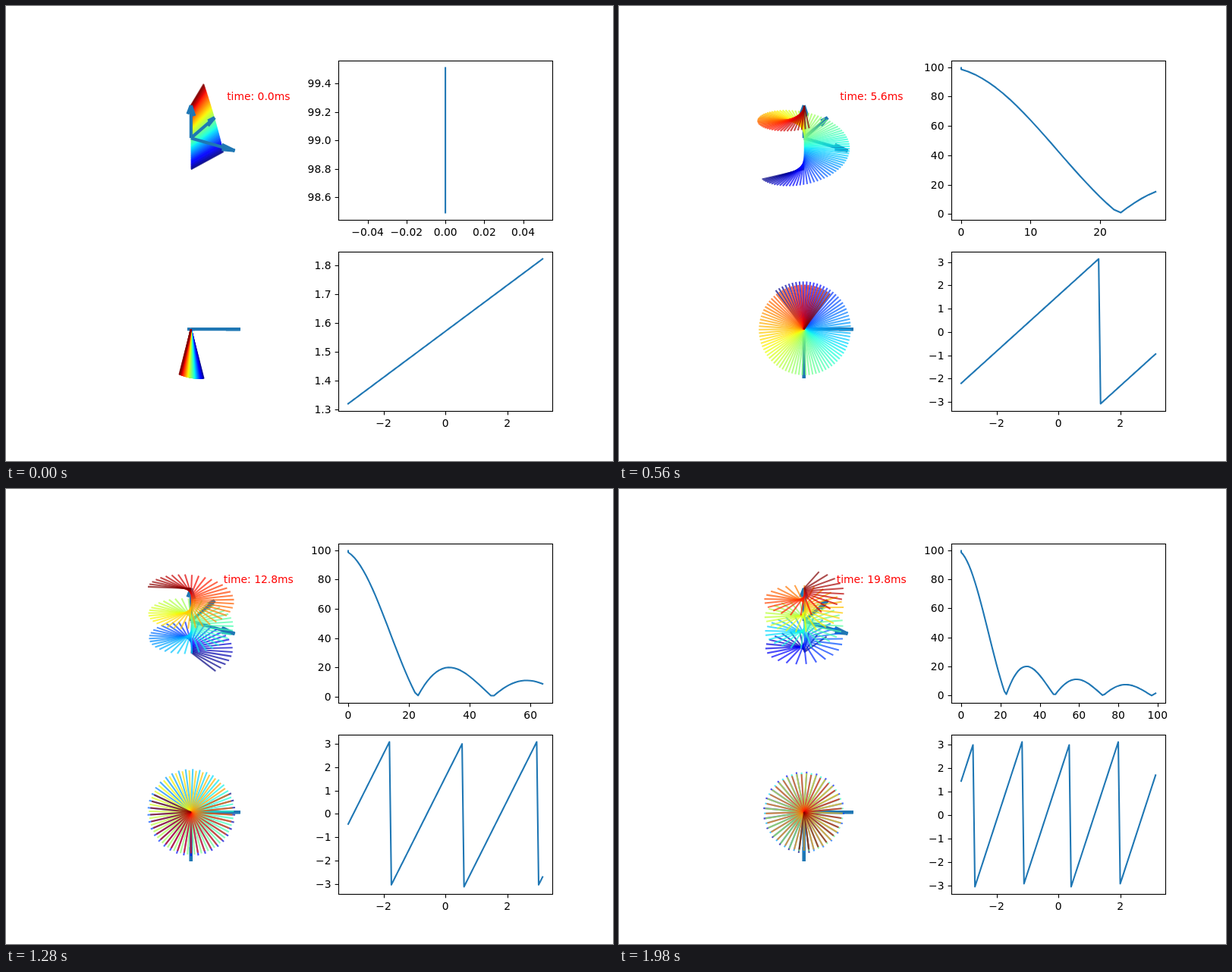
Animation of 800 by 600 pixels, one loop 2 s. Source, as an HTML page with a canvas:

```html
<!DOCTYPE html>
<html>
<head>
<meta charset="utf-8">
<style>
html, body { margin: 0; width: 100%; height: 100%; overflow: hidden; background: #fff; }
canvas { display: block; }
</style>
</head>
<body>
<canvas id="stage" width="800" height="600"></canvas>
<script>
const ctx = document.getElementById('stage').getContext('2d');
const PI = Math.PI, COUNT = 100, FRAMES = 100, FRAME_MS = 20;
const BLUE = '#1f77b4', THIN = 1.11, LINE = 2.083, THICK = 4.167, TICK = 4.86;
const LEFT = 438.18, WIDTH = 281.82, HEIGHT = 210;
const range = n => Array.from({ length: n }, (_, i) => i);
const snap = v => Math.round(v) + 0.5;

function stroke(points, color, width, cap = 'butt') {
  ctx.strokeStyle = color;
  ctx.lineWidth = width;
  ctx.lineCap = cap;
  ctx.lineJoin = 'round';
  ctx.beginPath();
  points.forEach(([x, y]) => ctx.lineTo(x, y));
  ctx.stroke();
}

function label(text, x, y, align, color = '#000') {
  ctx.font = '13.89px "DejaVu Sans", sans-serif';
  ctx.textAlign = align;
  ctx.fillStyle = color;
  ctx.fillText(text, x, y);
}

// Piecewise linear lookup through [position, value] stops
function ramp(stops, v) {
  const i = Math.max(1, stops.findIndex(s => v <= s[0]));
  const [a, p] = stops[i - 1], [b, q] = stops[i];
  return 255 * (p + (q - p) * (v - a) / (b - a));
}

const JET = [
  [[0, 0], [0.35, 0], [0.66, 1], [0.89, 1], [1, 0.5]],
  [[0, 0], [0.125, 0], [0.375, 1], [0.64, 1], [0.91, 0], [1, 0]],
  [[0, 0.5], [0.11, 1], [0.34, 1], [0.65, 0], [1, 0]]
];
const spins = range(COUNT).map(i => {
  const v = i / (COUNT - 1);
  return { z: 2 * v - 1, color: `rgba(${JET.map(s => Math.round(ramp(s, v)))},0.7)` };
});

// Perspective camera looking at the origin, drawn around (243.8, cy)
function camera(azim, elev, cy) {
  const a = azim * PI / 180, e = elev * PI / 180;
  const ca = Math.cos(a), sa = Math.sin(a), ce = Math.cos(e), se = Math.sin(e);
  return ([x, y, z]) => {
    x *= 4 / 7; y *= 4 / 7; z *= 3 / 7;
    const near = ce * (ca * x + sa * y) + se * z;
    const k = 1135.135 / (10 - near);
    return [243.84 + k * (ca * y - sa * x), cy - k * (ce * z - se * (ca * x + sa * y))];
  };
}
const sideView = camera(-60, 30, 174.16);
const endView = camera(-90, -90, 426.16);

const C = 1 - 0.3 * Math.cos(PI / 12), S = 0.3 * Math.sin(PI / 12);
const ARROWS = [
  [[1, 0, 0], [C, 0, S], [C, 0, -S]],
  [[0, 1, 0], [0, C, S], [0, C, -S]],
  [[0, 0, 1], [S, 0, C], [-S, 0, C]]
];

function drawArrows(view) {
  for (const [tip, ...barbs] of ARROWS)
    for (const p of [[0, 0, 0], ...barbs]) stroke([view(p), view(tip)], BLUE, THICK);
}

const twist = n => 0.04 * n;
const decay = n => Math.exp(-n / 450);

function drawSpins(view, n) {
  const r = decay(n);
  for (const { z, color } of spins) {
    const phase = PI / 2 + twist(n) * PI * z;
    const tip = [r * Math.cos(phase), r * Math.sin(phase), z];
    stroke([view([0, 0, z]), view(tip)], color, LINE);
  }
}

function signal(n) {
  const sum = spins.reduce((s, { z }) => s + Math.cos(twist(n) * PI * z), 0);
  return Math.abs(sum) * decay(n);
}

function wrapped(n, z) {
  const phase = PI / 2 + twist(n) * PI * z;
  return Math.atan2(Math.sin(phase), Math.cos(phase));
}

function limits(values) {
  let lo = Math.min(...values), hi = Math.max(...values);
  if (lo === hi) { lo -= 0.05; hi += 0.05; }
  const pad = 0.05 * (hi - lo);
  return [lo - pad, hi + pad];
}

function ticks([lo, hi], bins) {
  const raw = (hi - lo) / bins, base = Math.floor(Math.log10(raw));
  const m = [1, 2, 2.5, 5, 10].find(s => s * 10 ** base >= raw);
  const step = m * 10 ** base;
  const digits = Math.max(0, (m === 2.5 ? 1 : m === 10 ? -1 : 0) - base);
  const first = Math.ceil(lo / step), last = Math.floor(hi / step);
  return range(last - first + 1).map(i => {
    const v = (first + i) * step;
    return [v, (v < 0 ? '\u2212' : '') + Math.abs(v).toFixed(digits)];
  });
}

function plot(top, points) {
  const xs = limits(points.map(p => p[0])), ys = limits(points.map(p => p[1]));
  const px = v => LEFT + WIDTH * (v - xs[0]) / (xs[1] - xs[0]);
  const py = v => top + HEIGHT * (ys[1] - v) / (ys[1] - ys[0]);
  const bottom = top + HEIGHT;
  for (const [v, text] of ticks(xs, 6)) {
    const x = snap(px(v));
    stroke([[x, bottom + 0.5], [x, bottom + 0.5 + TICK]], '#000', THIN);
    label(text, px(v), bottom + 21, 'center');
  }
  for (const [v, text] of ticks(ys, 7)) {
    const y = snap(py(v));
    stroke([[LEFT + 0.3, y], [LEFT + 0.3 - TICK, y]], '#000', THIN);
    label(text, LEFT - 9.7, Math.round(py(v) + 5), 'right');
  }
  stroke(points.map(([x, y]) => [px(x), py(y)]), BLUE, LINE, 'square');
  ctx.strokeStyle = '#000';
  ctx.lineWidth = THIN;
  ctx.lineJoin = 'miter';
  ctx.strokeRect(438.5, top + 0.5, 282, HEIGHT);
}

function draw(k) {
  const n = k + 2;
  ctx.fillStyle = '#fff';
  ctx.fillRect(0, 0, 800, 600);

  // The arrows fall behind once a spin swings closer to the viewer
  const layers = [drawSpins, drawArrows];
  if (n >= 18) layers.reverse();
  layers.forEach(layer => layer(sideView, n));
  label(`time: ${(0.2 * k).toFixed(1)}ms`, 332.8, 124, 'center', '#f00');

  drawArrows(endView);
  drawSpins(endView, n);

  plot(72, range(k + 2).map(i => [Math.max(0, i - 1), signal(i + 1)]));
  plot(324, spins.map(({ z }) => [PI * z, wrapped(n, z)]));
}

const start = performance.now();
function loop() {
  const elapsed = performance.now() - start;
  draw(Math.floor((elapsed + 0.01) / FRAME_MS) % FRAMES);
  requestAnimationFrame(loop);
}
loop();
</script>
</body>
</html>
```
